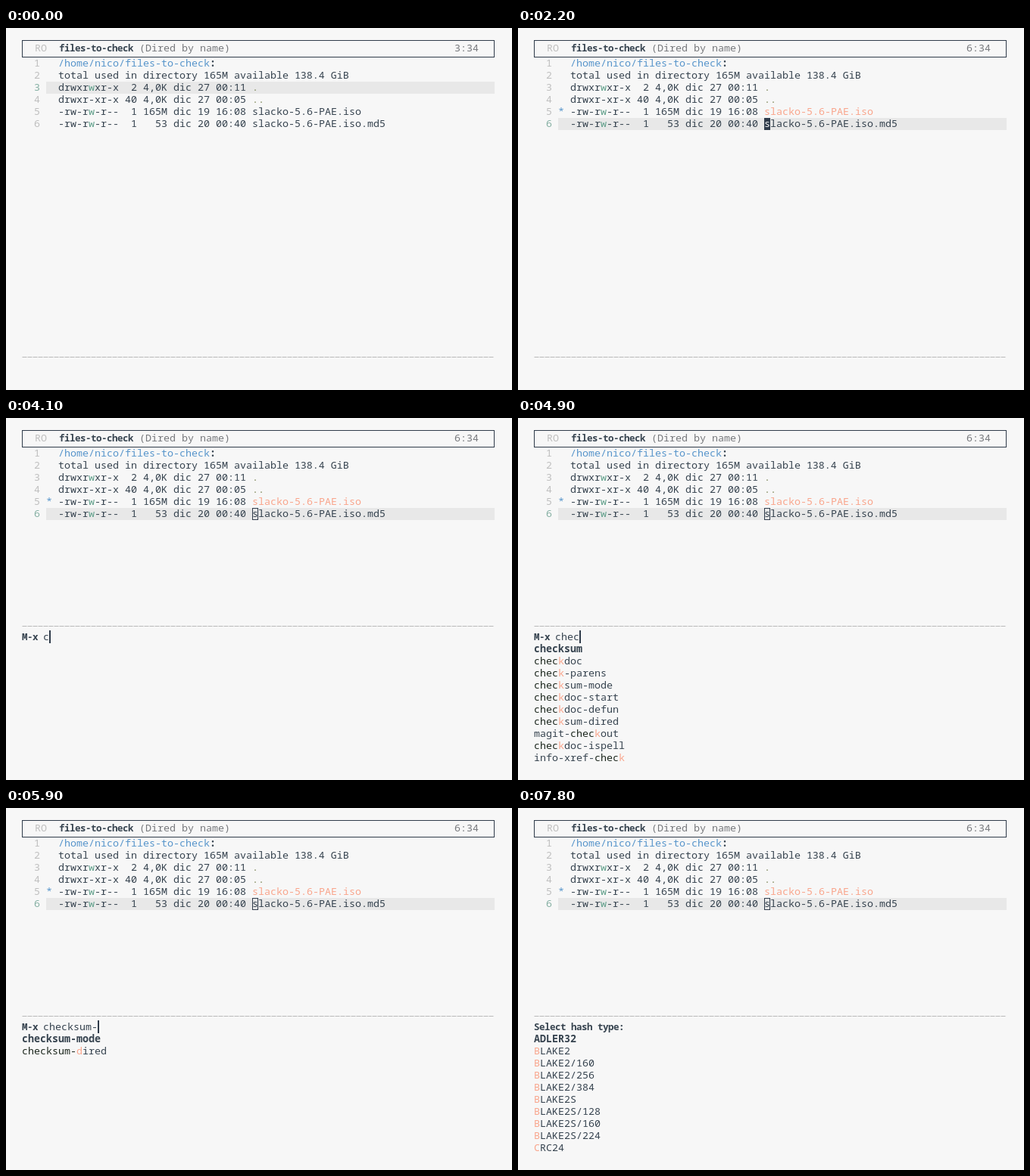
An HTML page that plays this animation: 668 px wide and 479 px high, repeating every 8 s.

```html
<!DOCTYPE html>
<html lang="en">
<head>
<meta charset="utf-8">
<title>Checksum from a file listing</title>
<style>
  html, body { margin: 0; width: 100%; height: 100%; overflow: hidden; background: #f7f7f7; }
  svg { display: block; width: 668px; height: 479px; }
  text { font: 400 13.3333px "Noto Sans Mono", "DejaVu Sans Mono", monospace; white-space: pre; fill: #36434f; font-variant-ligatures: none; }
  .title { font-size: 12.5px; font-weight: 600; letter-spacing: -.5px; }
  .bold { font-weight: 700; }
  .soft { fill: #77797d; }
  .faint { fill: #bfbfbf; }
  .now { fill: #86b0a4; }
  .write { fill: #5f9f8a; }
  .dir { fill: #5795cb; }
  .dots { fill: #7f8a5c; }
  .hot { fill: #f9a58c; }
  .hit { fill: #1c271d; }
  .inv { fill: #f7f7f7; }
</style>
</head>
<body>
<svg id="stage" viewBox="0 0 668 479"></svg>
<script>
const LOOP = 8000, INK = '#2f3b4a', CELL = 8, ROW = 16, NAME_X = 325;
const stage = document.getElementById('stage');

const files = [
  ['drwxrwxr-x  2 4,0K dic 27 00:11 ', '.'],
  ['drwxr-xr-x 40 4,0K dic 27 00:05 ', '..'],
  ['-rw-rw-r--  1 165M dic 19 16:08 ', 'slacko-5.6-PAE.iso'],
  ['-rw-rw-r--  1   53 dic 20 00:40 ', 'slacko-5.6-PAE.iso.md5']
];

const words = s => s.split(' ');
const recent = words('checksum gif-screencast eval-buffer list-packages describe-char dired-do-rename ' +
  'highlight-changes-visible-mode package-install toggle-truncate-lines auto-revert-mode');
const forChe = words('checksum checkdoc run-scheme calc-choose scheme-mode cache-reset search-menu ' +
  'archive-mode check-parens magit-cherry');
const forChec = words('checksum checkdoc check-parens checksum-mode checkdoc-start checkdoc-defun ' +
  'checksum-dired magit-checkout checkdoc-ispell info-xref-check');
const forChecks = words('checksum check-parens checksum-mode checkdoc-start checksum-dired checkdoc-ispell ' +
  'checkdoc-comments checkdoc-ispell-start checkdoc-ispell-defun checkdoc-rogue-spaces');
const forChecksu = words('checksum checksum-mode checksum-dired checkdoc-ispell-defun ' +
  'checkdoc-ispell-continue checkdoc-ispell-current-buffer');
const hashes = words('ADLER32 BLAKE2 BLAKE2/160 BLAKE2/256 BLAKE2/384 BLAKE2S BLAKE2S/128 ' +
  'BLAKE2S/160 BLAKE2S/224 CRC24');

// Start time, prompt, typed input, candidates, inline hint
const MX = 'M-x ', HASH = 'Select hash type: ';
const prompts = [
  [3300, MX, '', []],
  [3700, MX, '', recent],
  [4100, MX, 'c', []],
  [4300, MX, 'ch', []],
  [4400, MX, 'che', []],
  [4700, MX, 'che', forChe],
  [4900, MX, 'chec', forChec],
  [5000, MX, 'check', forChec],
  [5100, MX, 'checks', forChecks],
  [5200, MX, 'checksu', forChecksu],
  [5500, MX, 'checksum', forChecksu.slice(0, 3)],
  [5900, MX, 'checksum-', forChecksu.slice(1, 3)],
  [6100, MX, 'checksum-d', [], '(ired) [Matched]'],
  [6200, MX, 'checksum-di', [], '(red) [Matched]'],
  [7200, HASH, '', []],
  [7300, HASH, '', hashes]
];

const within = (t, ...spans) => spans.some(([a, b]) => t >= a && t < b);
const span = (s, cls) => s ? `<tspan class="${cls}">${s}</tspan>` : '';
const text = (x, y, body, cls = '') => `<text x="${x}" y="${y}" class="${cls}">${body}</text>`;
const rect = (x, y, w, h, fill, stroke = 'none') =>
  `<rect x="${x}" y="${y}" width="${w}" height="${h}" fill="${fill}" stroke="${stroke}"/>`;
const rule = y => `<path d="M21.5 ${y}.5H644" stroke="#b9b9b9" stroke-dasharray="6 1"/>`;

// Marks the typed letters in order, then the letter after the last one.
function highlight(name, input) {
  let found = 0, out = '';
  for (let i = 0, ended = false; i < name.length; i++) {
    if (found < input.length) {
      const same = name[i] === input[found];
      out += same ? span(name[i], 'hit') : name[i];
      if (same) found++;
    } else {
      out += ended ? name[i] : span(name[i], 'hot');
      ended = true;
    }
  }
  return out;
}

function header(line) {
  return rect(21.5, 16.5, 623, 22, 'none', INK) +
    text(38, 31, 'RO', 'faint') + text(70, 31, 'files-to-check', 'title') +
    text(176, 31, '(Dired by name)', 'soft') + text(592, 31, line + ':34', 'soft');
}

function listing(t, line) {
  const top = n => 39 + (n - 1) * ROW, base = n => top(n) + 12;
  const block = within(t, [100, 600], [1000, 2000], [2200, 2700]);
  let out = rect(53, top(line), 592, ROW, '#e8e8e8');
  for (let n = 1; n <= 6; n++) out += text(37, base(n), n, n === line ? 'now' : 'faint');
  out += text(69, base(1), span('/home/nico/files-to-check', 'dir') + span(':', 'bold')) +
    text(69, base(2), 'total used in directory 165M available 138.4 GiB');
  files.forEach(([info, name], i) => {
    const n = i + 3, here = n === line, marked = n === 5 && t >= 2200;
    const flag = info[5] === 'w' ? span('w', 'write') : info[5];
    out += text(69, base(n), info.slice(0, 5) + flag + info.slice(6));
    if (marked) out += text(53, base(n), '*', 'dir');
    if (here && block) out += rect(NAME_X, top(n), CELL, ROW, INK);
    if (here && t >= 3300) out += rect(NAME_X + .5, top(n) + .5, CELL - 1, ROW - 1, 'none', INK);
    const cls = marked ? 'hot' : i < 2 ? 'dots' : '';
    out += text(NAME_X, base(n), here && block ? span(name[0], 'inv') + name.slice(1) : name, cls);
  });
  return out;
}

function minibuffer(t, state) {
  if (!state) return rule(435);
  const [, prompt, input, names, hint = ''] = state;
  const start = 21 + prompt.length * 7;
  let out = rule(275) + text(21, 294, prompt, 'title') + text(start, 294, input + hint);
  names.forEach((name, i) => {
    out += text(21, 310 + i * ROW, i ? highlight(name, input) : name, i ? '' : 'bold');
  });
  if (!within(t, [6700, 7200], [7800, LOOP]))
    out += rect(start + input.length * CELL, 281, 2, 17, INK);
  return out;
}

let shown = '';
function render(t) {
  const line = t < 1000 ? 3 : t < 1500 ? 4 : t < 2200 ? 5 : 6;
  const state = prompts.filter(p => p[0] <= t).pop();
  const next = header(line) + listing(t, line) + minibuffer(t, state);
  if (next !== shown) stage.innerHTML = shown = next;
}

const began = performance.now();
function tick() {
  render((performance.now() - began) % LOOP);
  requestAnimationFrame(tick);
}
tick();
</script>
</body>
</html>
```
